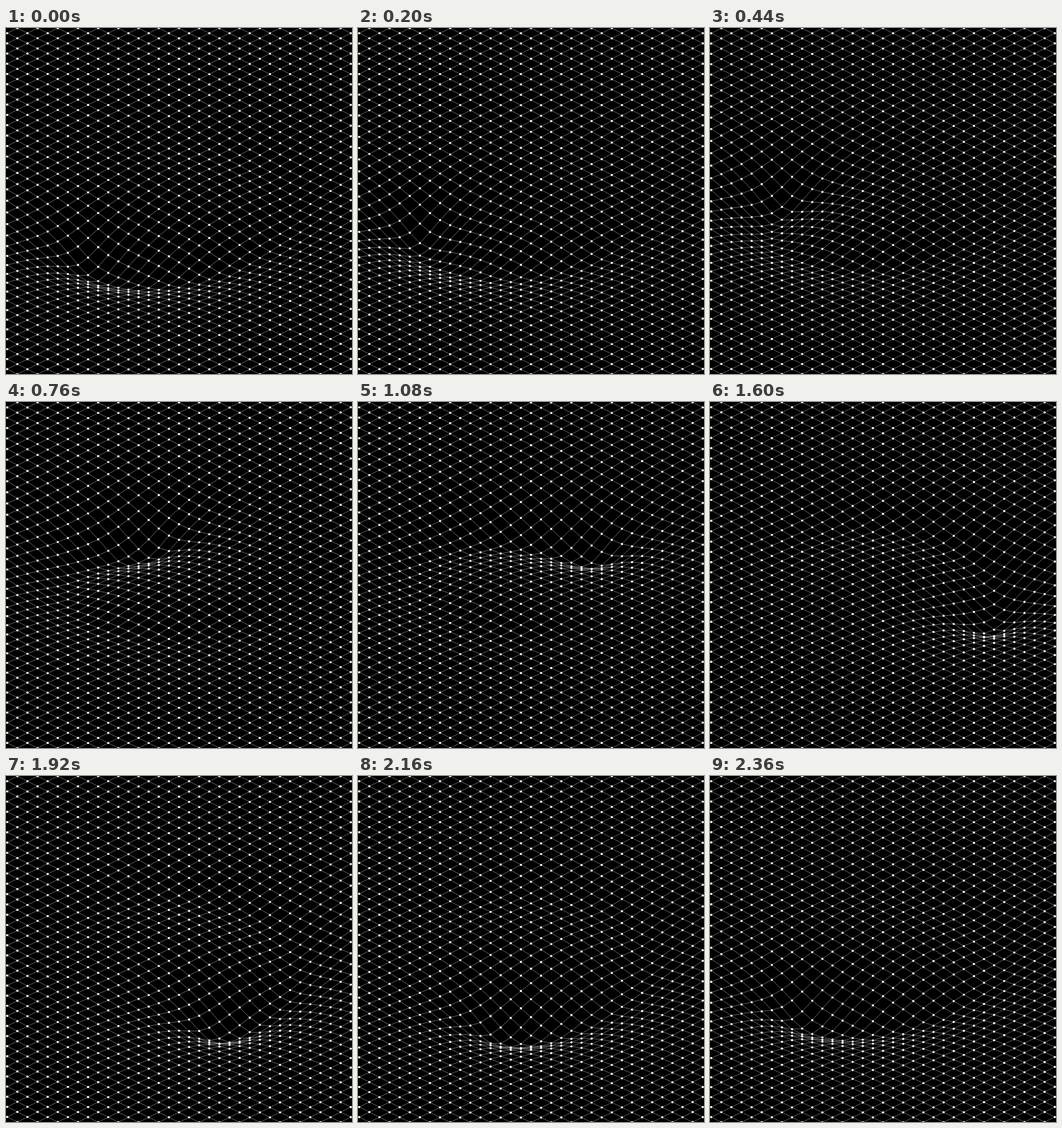
An HTML page with a canvas for the animation above (2400 ms loop, 500x500 px).

```html
<!DOCTYPE html>
<html lang="en">
<head>
<meta charset="utf-8">
<title>Dented mesh</title>
<style>
  html, body { margin: 0; width: 100%; height: 100%; overflow: hidden; background: #000; }
  canvas { display: block; width: 500px; height: 500px; }
</style>
</head>
<body>
<canvas id="stage" width="500" height="500"></canvas>
<script>
const ctx = document.getElementById('stage').getContext('2d');

const LOOP = 2400, STEP = 40;
const MID = 250, DX = 14.6, DY = 7.35;   // half sizes of one diamond
const COLS = 18, TOP = -50, BOTTOM = 36;
const ORBIT = 165, START = 146 * Math.PI / 180;
const DEPTH = 34, REACH = 72, ROUND = 18, WAKE = 260;
const LAGS = 120, LAG = 2 * Math.PI / LAGS, SHARP = 3;

// Nodes of the flat sheet, keyed by column and row
const nodes = new Map();
const key = (i, j) => i * 1000 + j;
for (let i = -COLS; i <= COLS; i++) {
  for (let j = TOP; j <= BOTTOM; j++) {
    if ((i + j) % 2 === 0) nodes.set(key(i, j), { i, j, x: MID + i * DX, y: 0 });
  }
}

const edges = [];
for (const n of nodes.values()) {
  for (const dj of [-1, 1]) {
    const m = nodes.get(key(n.i + 1, n.j + dj));
    if (m) edges.push([n, m]);
  }
}

// Past positions of the weight; older ones press less
function trail(angle) {
  return Array.from({ length: LAGS }, (_, k) => {
    const a = angle - k * LAG;
    return {
      x: ORBIT * Math.cos(a),
      y: ORBIT * Math.sin(a),
      fade: k * LAG * ORBIT / WAKE
    };
  });
}

// The sheet is seen at a 2:1 tilt, so its depth runs twice as far as screen y
function sag(x, y, path) {
  let sum = 0;
  for (const p of path) {
    const dx = x - p.x, dy = y - p.y;
    const d = Math.sqrt(dx * dx + dy * dy + ROUND * ROUND) - ROUND;
    sum += Math.exp(-SHARP * (d / REACH + p.fade));
  }
  return DEPTH * Math.cbrt(sum);
}

function draw(t) {
  const path = trail(START + t / LOOP * 2 * Math.PI);
  for (const n of nodes.values()) {
    n.y = MID + n.j * DY + sag(n.i * DX, n.j * DY * 2, path);
  }

  ctx.fillStyle = '#000';
  ctx.fillRect(0, 0, 500, 500);

  ctx.strokeStyle = 'rgba(255,255,255,.4)';
  ctx.lineWidth = 0.9;
  ctx.beginPath();
  for (const [a, b] of edges) {
    ctx.moveTo(a.x, a.y);
    ctx.lineTo(b.x, b.y);
  }
  ctx.stroke();

  ctx.fillStyle = '#fff';
  ctx.beginPath();
  for (const n of nodes.values()) {
    ctx.moveTo(n.x + 1.6, n.y);
    ctx.arc(n.x, n.y, 1.6, 0, 2 * Math.PI);
  }
  ctx.fill();
}

const begin = performance.now();
let shown = -1;
function tick() {
  const t = Math.floor((performance.now() - begin) % LOOP / STEP) * STEP;
  if (t !== shown) draw(shown = t);
  requestAnimationFrame(tick);
}
tick();
</script>
</body>
</html>
```
